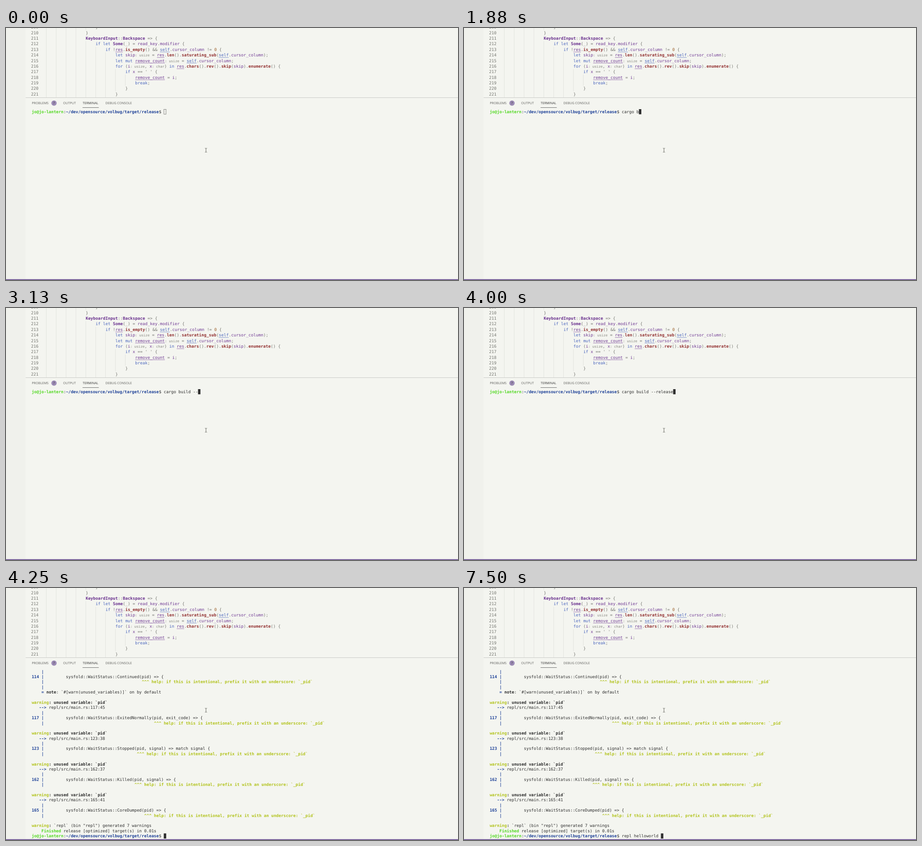
An HTML page that plays this animation: 1002x559 px, repeating every 8000 ms.

```html
<!DOCTYPE html>
<html lang="en">
<head>
<meta charset="utf-8">
<title>Terminal session</title>
<style>
  html, body { margin: 0; width: 100%; height: 100%; overflow: hidden; background: #f4f5f0; }
  svg { display: block; width: 1002px; height: 559px; }
  text { white-space: pre; text-rendering: geometricPrecision; }
  .mono { font-family: "DejaVu Sans Mono", monospace; }
  .ui { font: 7.15px "Open Sans", "Noto Sans", sans-serif; fill: #5e5e5c; }
</style>
</head>
<body>
<svg id="stage" viewBox="0 0 1002 559">
  <defs><clipPath id="pane"><rect width="1002" height="154"/></clipPath></defs>
  <rect width="1002" height="559" fill="#f4f5f0"/>
  <rect width="43.5" height="559" fill="#f0f1ec"/>
  <g class="mono" clip-path="url(#pane)"><g id="editor"></g></g>
  <rect x="43.5" y="154" width="958.5" height="1" fill="#c9cac6"/>
  <g class="ui">
    <text x="57.3" y="169.2">PROBLEMS</text>
    <circle cx="106.4" cy="166.6" r="5.9" fill="#9c8bb5"/>
    <text x="106.4" y="169.2" text-anchor="middle" fill="#333">7</text>
    <text x="126.8" y="169.2">OUTPUT</text>
    <text x="170" y="169.2" style="fill:#343434">TERMINAL</text>
    <text x="220.5" y="169.2">DEBUG CONSOLE</text>
    <rect x="169.7" y="176.2" width="36" height="0.8" fill="#4c4c4c"/>
  </g>
  <g id="panel" class="mono"><g id="term"></g><rect id="cursor"/></g>
  <path d="M441 266.8h1.6l.7.6l.7-.6h1.6M441 275.4h1.6l.7-.6l.7.6h1.6M443.3 267.4v7.4" fill="none" stroke="#55564f" stroke-width="0.9"/>
  <rect y="557.2" width="1002" height="1.8" fill="#705697"/>
</svg>
<script>
const NS = "http://www.w3.org/2000/svg";
const $ = id => document.getElementById(id);

// Editor and terminal are laid out on an 1848px wide screen, shown at 1002px
const SCALE = 1002 / 1848, SIZE = 16.8, ADVANCE = 0.60205;
for (const id of ["editor", "panel"]) $(id).setAttribute("transform", `scale(${SCALE})`);

function add(parent, tag, attrs, text) {
  const el = document.createElementNS(NS, tag);
  for (const k in attrs) el.setAttribute(k, attrs[k]);
  if (text) el.textContent = text;
  return parent.appendChild(el);
}

// Each run starts with a style letter: colour, weight, underline, hint size.
const STYLES = {
  p: { fill: "#74756f" },
  k: { fill: "#4b66bd" },
  K: { fill: "#4b66bd", line: true },
  v: { fill: "#703a94" },
  V: { fill: "#703a94", line: true },
  T: { fill: "#682f8d", bold: true },
  f: { fill: "#923030", bold: true },
  n: { fill: "#9c5d27" },
  h: { fill: "#85867f", hint: true },
  d: { fill: "#2f2f2f" },
  D: { fill: "#2f2f2f", bold: true },
  g: { fill: "#52d822", bold: true },
  y: { fill: "#b2c31d", bold: true },
  b: { fill: "#1f4298", bold: true }
};

function runs(parent, line, x, y, cell) {
  if (!line) return;
  for (const run of line.split("¦")) {
    const st = STYLES[run[0]], text = run.slice(1);
    const zoom = st.hint ? 0.83 : 1, w = cell * zoom, size = SIZE * zoom;
    const lead = text.length - text.trimStart().length;
    add(parent, "text", {
      x: x + lead * w, y, fill: st.fill, "font-size": size,
      "letter-spacing": w - size * ADVANCE,
      "font-weight": st.bold ? 700 : 400
    }, text.trim());
    if (st.line) add(parent, "rect", { x, y: y + 3.7, width: text.length * w, height: 1.2, fill: st.fill });
    x += text.length * w;
  }
}

// Editor: [indent level, code], first line is 209
const CODE = [
  [5, "p}"],
  [4, "p}"],
  [4, "TKeyboardInput¦p::¦TBackspace¦p => {"],
  [5, "kif let ¦TSome¦p(_) = ¦vread_key¦p.¦vmodifier¦p {"],
  [6, "kif ¦p!¦Vres¦p.¦fis_empty¦p() && ¦Kself¦p.¦vcursor_column¦p != ¦n0¦p {"],
  [7, "klet ¦vskip¦h: usize¦p = ¦Vres¦p.¦flen¦p().¦fsaturating_sub¦p(¦Kself¦p.¦vcursor_column¦p);"],
  [7, "klet mut ¦Vremove_count¦h: usize¦p = ¦Kself¦p.¦vcursor_column¦p;"],
  [7, "kfor ¦p(¦vi¦h: usize¦p, ¦vx¦h: char¦p) ¦kin ¦Vres¦p.¦fchars¦p().¦frev¦p().¦fskip¦p(¦vskip¦p).¦fenumerate¦p() {"],
  [8, "kif ¦vx¦p == ' ' {"],
  [9, "Vremove_count¦p = ¦vi¦p;"],
  [9, "kbreak¦p;"],
  [8, "p}"],
  [7, "p}"],
  [7, "vres¦p.¦vf¦p(&¦vf¦p);"]
];
const EDIT = { x: 164, y: 2.5, cell: SIZE * ADVANCE, row: 22.8 };

CODE.forEach(([level, code], i) => {
  const y = EDIT.y + i * EDIT.row, tab = 4 * EDIT.cell;
  for (let g = 0; g < level; g++)
    add($("editor"), "rect", { x: EDIT.x + g * tab, y: y - 17, width: 1, height: EDIT.row, fill: "#d3d4ce" });
  runs($("editor"), "p" + (209 + i), 102.5, y, EDIT.cell);
  runs($("editor"), code, EDIT.x + level * tab, y, EDIT.cell);
});

// Terminal
const TERM = { x: 105, top: 332, cell: 10, row: 21, base: 16 };
const PROMPT = "gjo@jo-lantern¦d:¦b~/dev/opensource/volbug/target/release¦d$ ";
const PROMPT_LEN = 54;
const BUILD = "cargo build --release", RUN = "repl helloworld ";

const manifest = ["debug_info", "cli", "server"].flatMap(dir => ["doctest", "test"].map(key =>
  `ywarning¦D:¦d /home/jo/dev/opensource/volbug/${dir}/Cargo.toml: unused manifest key: package.${key}`));

const BAR = "b    |";
const snippet = (line, col, code) => [
  BAR,
  `b${line} |¦d         sysfold::WaitStatus::${code} {`,
  BAR + "¦y" + " ".repeat(col) + "^^^ help: if this is intentional, prefix it with an underscore: `_pid`"
];
const unused = (line, col, code) => [
  "", "ywarning¦D: unused variable: `pid`",
  `b   -->¦d repl/src/main.rs:${line}:${col}`,
  ...snippet(line, col, code)
];
const report = [
  ...snippet(114, 40, "Continued(pid) =>"),
  BAR,
  "b    =¦D note¦d: `#[warn(unused_variables)]` on by default",
  ...unused(117, 45, "ExitedNormally(pid, exit_code) =>"),
  ...unused(123, 38, "Stopped(pid, signal) => match signal"),
  ...unused(162, 37, "Killed(pid, signal) =>"),
  ...unused(165, 41, "CoreDumped(pid) =>"),
  "", "ywarning¦D:¦d `repl` (bin \"repl\") generated 7 warnings",
  "g    Finished¦d release [optimized] target(s) in 0.01s"
];

const typed = (cmd, n) => PROMPT + (n ? "¦d" + cmd.slice(0, n) : "");
const SCREENS = {
  type: n => ({ lines: [typed(BUILD, n)], row: 0, col: PROMPT_LEN + n }),
  warn: () => ({ lines: [typed(BUILD, BUILD.length), ...manifest], row: 7, col: 0 }),
  done: n => ({ lines: [...report, typed(RUN, n)], row: report.length, col: PROMPT_LEN + n })
};

// [start in ms, screen, typed characters]
const STEPS = [
  [0, "type", 0], [380, "type", 0],
  [880, "type", 1], [1000, "type", 2], [1130, "type", 3],
  [1380, "type", 5], [1500, "type", 6],
  [1880, "type", 7], [2000, "type", 8], [2250, "type", 9],
  [2750, "type", 11], [2880, "type", 12], [3000, "type", 13], [3130, "type", 14],
  [3250, "type", 15], [3380, "type", 17], [3500, "type", 18], [3630, "type", 20],
  [4000, "type", 21], [4130, "warn", 0], [4250, "done", 0],
  [6380, "done", 1], [6500, "done", 2], [6630, "done", 4], [6750, "done", 5],
  [7250, "done", 6], [7500, "done", 16]
];
const LOOP = 8000;

function show(step) {
  const [, name, n] = STEPS[step];
  const { lines, row, col } = SCREENS[name](n);
  $("term").replaceChildren();
  lines.forEach((line, i) =>
    runs($("term"), line, TERM.x, TERM.top + TERM.base + i * TERM.row, TERM.cell));

  const hollow = step === 0, inset = hollow ? 0.5 : 0;
  const box = {
    x: TERM.x + col * TERM.cell + inset, y: TERM.top + row * TERM.row + inset,
    width: TERM.cell - 2 * inset, height: TERM.row - 2 * inset,
    fill: hollow ? "none" : "#2f2f2f", stroke: hollow ? "#2f2f2f" : "none"
  };
  for (const k in box) $("cursor").setAttribute(k, box[k]);
}

const start = performance.now();
let current = -1;
function tick() {
  const t = (performance.now() - start) % LOOP;
  const step = STEPS.findLastIndex(s => s[0] <= t);
  if (step !== current) show(current = step);
  requestAnimationFrame(tick);
}
tick();
</script>
</body>
</html>
```
